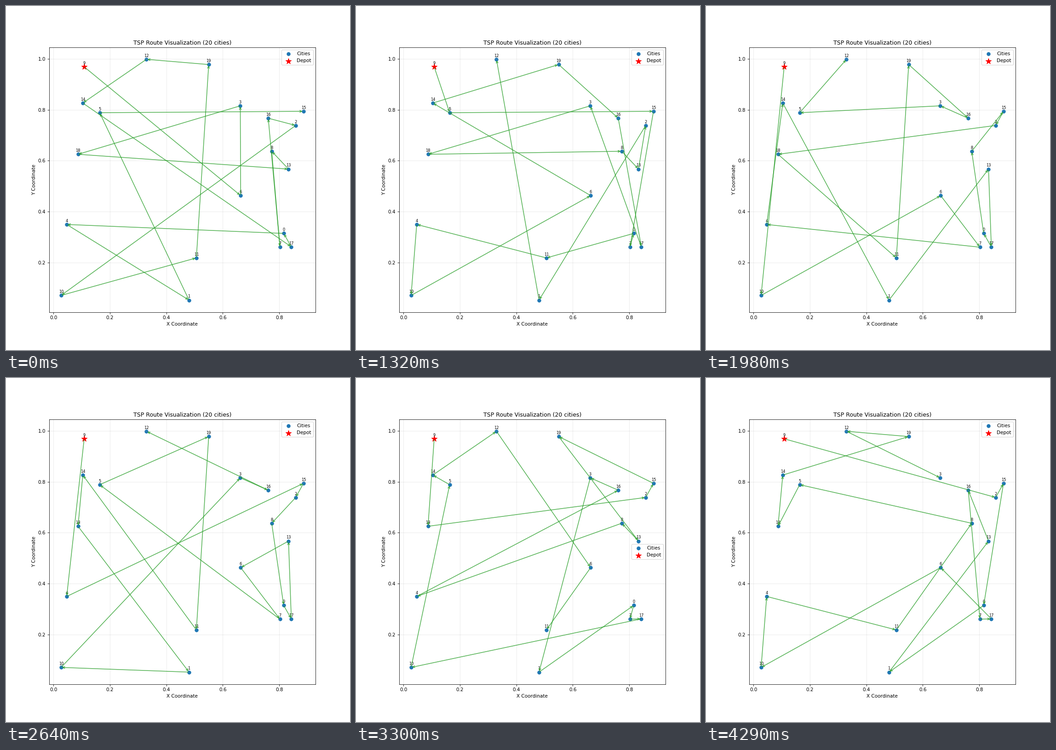
These frames come from a looping animation (748 by 748 pixels, 4.62 s). A matplotlib script:

```python
import matplotlib.pyplot as plt
import numpy as np
from matplotlib.animation import FuncAnimation
from matplotlib.patches import FancyArrowPatch

DEPOT = 9
CITIES = np.array([
    (0.8157, 0.3146), (0.4803, 0.0528), (0.8584, 0.7383), (0.6620, 0.8153),
    (0.0468, 0.3497), (0.1636, 0.7883), (0.6633, 0.4630), (0.8025, 0.2605),
    (0.7733, 0.6370), (0.1087, 0.9684), (0.0270, 0.0713), (0.5063, 0.2184),
    (0.3295, 0.9978), (0.8328, 0.5670), (0.1038, 0.8262), (0.8859, 0.7937),
    (0.7611, 0.7666), (0.8428, 0.2618), (0.0869, 0.6251), (0.5500, 0.9773),
])


def two_opt(route, first, last):
    """Reverse the stretch of the route from city first to city last."""
    i, j = route.index(first), route.index(last) + 1
    return route[:i] + route[i:j][::-1] + route[j:]


scattered = [9, 6, 3, 18, 13, 8, 7, 16, 2, 10, 11, 19, 12, 14, 17, 0, 4, 1, 5, 15]
zigzag = [9, 5, 15, 7, 0, 11, 4, 12, 1, 2, 18, 8, 13, 3, 17, 16, 19, 14, 6, 10]
fan = [9, 10, 6, 7, 4, 14, 1, 13, 17, 0, 8, 15, 2, 18, 11, 19, 16, 3, 5, 12]
cross = [9, 4, 15, 2, 8, 0, 17, 13, 6, 7, 5, 19, 11, 14, 18, 1, 10, 3, 16, 12]
sweep = [9, 18, 2, 15, 19, 13, 8, 4, 16, 3, 1, 0, 7, 17, 10, 5, 14, 12, 6, 11]
final = [9, 2, 15, 0, 1, 13, 16, 7, 17, 6, 10, 4, 11, 8, 5, 18, 14, 19, 12, 3]

swapped = two_opt(zigzag, 18, 13)
flipped = two_opt(swapped, 12, 10)
backward = two_opt(final, 15, 12)

routes = [
    scattered,
    two_opt(zigzag, 3, 16),
    zigzag,
    swapped,
    flipped,
    two_opt(flipped, 14, 1),
    fan,
    two_opt(fan, 6, 14),
    cross,
    two_opt(sweep, 13, 8),
    sweep,
    two_opt(backward, 8, 6),
    backward,
    final,
]
LEGEND_MOVES = {9: "lower right", 10: "center right"}

plt.rcParams["font.family"] = "DejaVu Sans"
fig, ax = plt.subplots(figsize=(10, 10), dpi=74.8)

stops = np.delete(CITIES, DEPOT, axis=0)
ax.scatter(*stops.T, s=50, c="tab:blue", label="Cities")
ax.scatter(*CITIES[DEPOT], s=150, c="red", marker="*", label="Depot")
ax.set_xlim(*ax.get_xlim())
ax.set_ylim(*ax.get_ylim())

for number, point in enumerate(CITIES):
    ax.annotate(str(number), point, xytext=(0, 5), textcoords="offset points",
                ha="center", fontsize=8)

arrows = [
    ax.add_patch(FancyArrowPatch((0, 0), (1, 1), arrowstyle="->", mutation_scale=10,
                                 shrinkA=2, shrinkB=2, color="tab:green",
                                 lw=1.5, alpha=0.8, zorder=3))
    for _ in range(len(CITIES) - 1)
]

ax.set_title(f"TSP Route Visualization ({len(CITIES)} cities)")
ax.set_xlabel("X Coordinate")
ax.set_ylabel("Y Coordinate")
ax.grid(True, alpha=0.3)
legend = ax.legend(loc="upper right")


def update(step):
    route = routes[step]
    for arrow, start, end in zip(arrows, route, route[1:]):
        arrow.set_positions(CITIES[start], CITIES[end])
    legend.set_loc(LEGEND_MOVES.get(step, "upper right"))
    return arrows + [legend]


anim = FuncAnimation(fig, update, frames=len(routes), interval=330, repeat=True)
plt.show()
```
